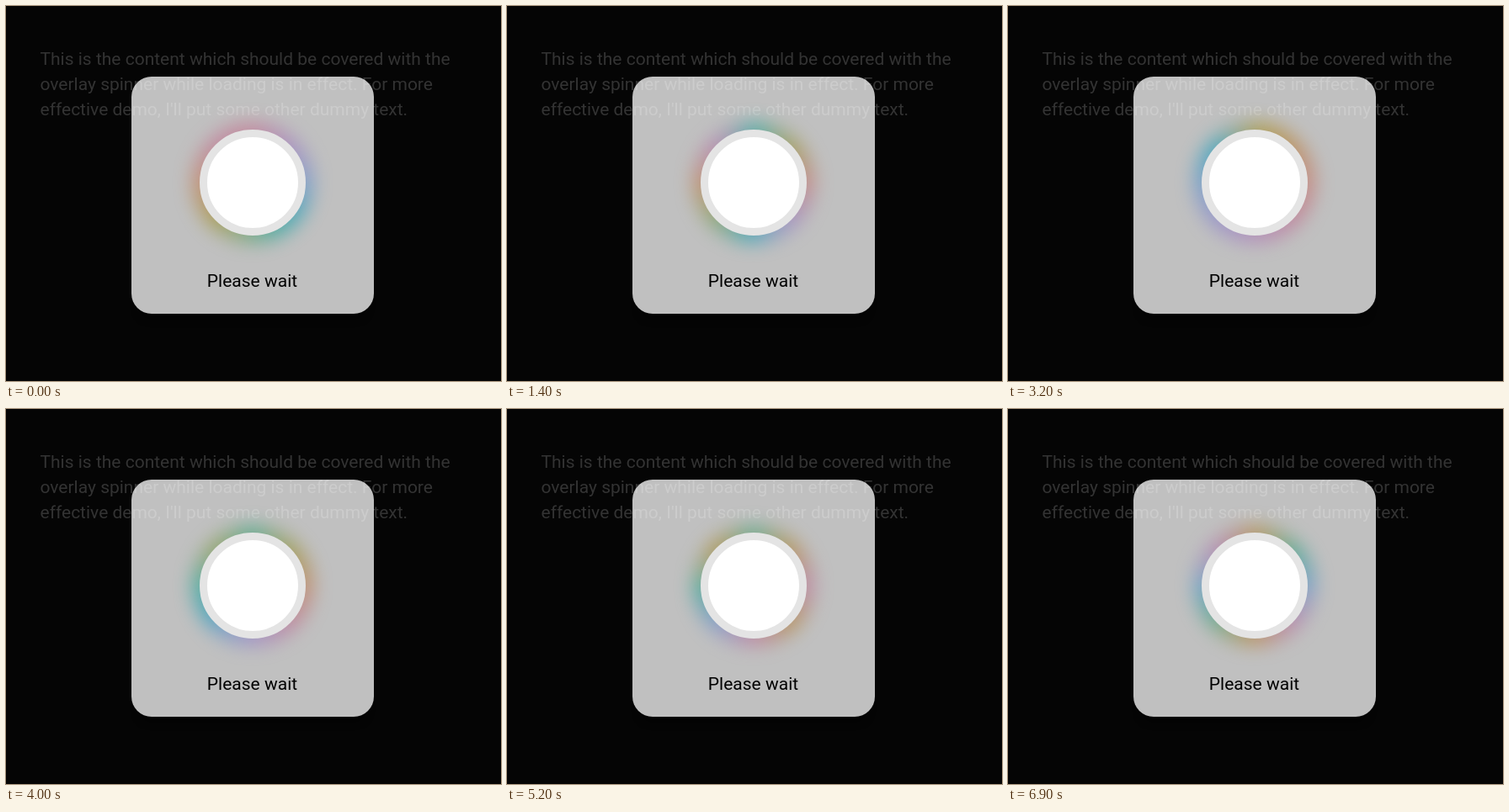
Recreate the animation shown at these times as an HTML page. Size 588 px wide and 446 px high, loop 7 s.

```html
<!DOCTYPE html>
<html lang="en">
<meta charset="utf-8">
<title>Loading overlay</title>
<style>
  html, body { margin: 0; width: 100%; height: 100%; overflow: hidden; background: #050505; }
  body { position: relative; font: 21px/30px Roboto, sans-serif; }
  body > * { position: absolute; margin: 0; }
  .content { left: 40.5px; top: 48px; color: #333; white-space: nowrap; }
  .card { left: 149px; top: 84px; width: 288px; height: 282px; border-radius: 24px; background: rgba(255, 255, 255, .75); box-shadow: 0 15px 12px -12px #000; }
  .disc { left: 230px; top: 147px; width: 108px; height: 108px; border: 9px solid #e4e4e4; border-radius: 50%; background: #fff; }
  .glow { left: 221px; top: 138px; width: 144px; height: 144px; border-radius: 50%; filter: blur(11px); opacity: .55; }
  .label { left: 149px; top: 312px; width: 287px; text-align: center; color: #000; }
</style>
<p class="content">This is the content which should be covered with the<br>overlay spinner while loading is in effect. For more<br>effective demo, I'll put some other dummy text.</p>
<div class="card"></div>
<div class="glow"></div>
<div class="disc"></div>
<p class="label">Please wait</p>
<script>
  const LOOP = 7000, STEP = 100, LOBES = 8;
  const glow = document.querySelector('.glow');

  // Each pose is a colour wheel: hue at the top, and its turn from lobe to lobe
  const poses = [
    { at: 0, hue: 0, turn: -52 },
    { at: 1400, hue: 190, turn: -83 },
    { at: 2200, hue: 195, turn: 85 },
    { at: 3200, hue: 100, turn: -35 },
    { at: 4700, hue: 225, turn: -78 },
    { at: 5700, hue: 105, turn: -100 },
    { at: 6900, hue: 75, turn: 88 },
  ];

  const hueOf = (pose, lobe) => ((pose.hue + pose.turn * lobe) % 360 + 360) % 360;

  // Shortest way round the colour wheel
  const mixHue = (a, b, k) => a + ((b - a + 540) % 360 - 180) * k;

  function draw(now) {
    const t = Math.floor(now % LOOP / STEP) * STEP;
    const next = Math.max(1, poses.findIndex(pose => pose.at >= t));
    const from = poses[next - 1], to = poses[next];
    const k = (t - from.at) / (to.at - from.at);
    const colors = Array.from({ length: LOBES }, (_, i) =>
      `oklch(.62 .13 ${mixHue(hueOf(from, i), hueOf(to, i), k)})`);
    glow.style.background = `conic-gradient(${[...colors, colors[0]]})`;
  }

  function tick() {
    draw(performance.now());
    requestAnimationFrame(tick);
  }
  tick();
</script>
</html>
```
